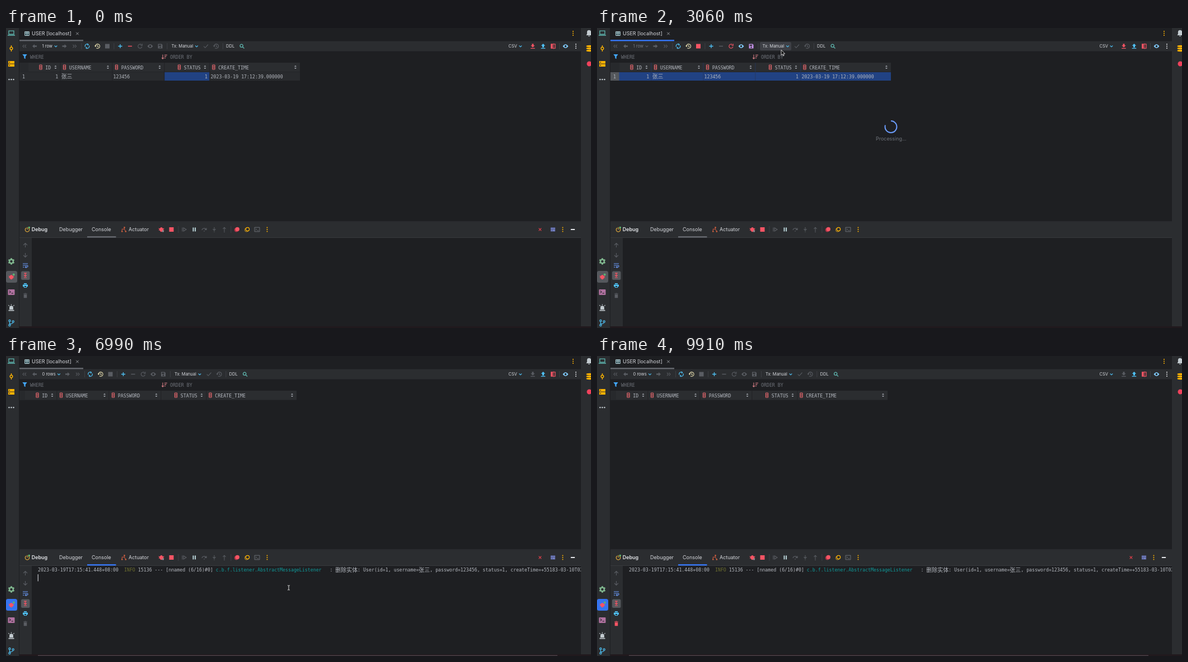
Recreate the animation shown at these times as an HTML page with a canvas. Size 1045 px wide and 536 px high, loop 9970 ms.

```html
<!DOCTYPE html>
<html lang="en">
<head>
<meta charset="utf-8">
<title>Table editor</title>
<style>
html, body { margin: 0; width: 100%; height: 100%; overflow: hidden; background: #1e1f22; }
canvas { display: block; }
</style>
</head>
<body>
<canvas id="stage" width="1045" height="536"></canvas>
<script>
const ctx = document.getElementById('stage').getContext('2d');
const LOOP = 9970;
const BG = '#1e1f22', PANEL = '#2b2d30', EDGE = '#43454a', DIM = '#5a5d63', TEXT = '#d5d7dc', MONO = '#b4b8bf',
  SELECT = '#214283', FOCUS = '#3574f0', IDLE = '#63666c',
  RED = '#f75464', CYAN = '#4fc3f7', ORANGE = '#ffb300', TEAL = '#5fb8b0', PURPLE = '#c792ea';
const PITCH = 4.966;

// Times of the user's actions
const ROW_CLICK = 1000, DELETE = 2130, SAVE = 2740, SAVED = 3400, CONSOLE_CLICK = 4640, LOGGED = 6980,
  DRAG = 7980, DROP = 8420, DESELECT = 9000;
const presses = [[ROW_CLICK, 1400], [DELETE, 2330], [SAVE - 90, 2800], [CONSOLE_CLICK, 4880], [DRAG, DROP], [DESELECT, 9130]];
const caretOn = [[CONSOLE_CLICK, 5190], [5660, 6190], [6650, 7580], [8050, 8840], [9110, 9640]];
const route = [
  [70, 330, 485], [930, 34, 86], [1450, 34, 86], [2000, 222, 33], [2350, 222, 33], [2600, 276, 33], [2800, 276, 33],
  [3050, 329, 39], [3450, 329, 39], [4060, 480, 200], [4390, 471, 416], [4880, 471, 416], [5190, 490, 415],
  [5660, 505, 414], [7560, 505, 414], [7940, 588, 382], [8050, 588, 382], [8450, 654, 412], [9060, 654, 412],
  [9280, 700, 320], [9510, 640, 512]
];

const ring = (r, x = 0, y = 0) => `M${x + r} ${y}A${r} ${r} 0 1 1 ${x - r} ${y}A${r} ${r} 0 1 1 ${x + r} ${y}Z`;
const dots3 = ring(1, 0, -3.5) + ring(1) + ring(1, 0, 3.5);
const P = {
  prev2: 'M-.5 -2.7L-3 0L-.5 2.7M3 -2.7L.5 0L3 2.7',
  next2: 'M.5 -2.7L3 0L.5 2.7M-3 -2.7L-.5 0L-3 2.7',
  left: 'M4 -1.2H0V-3.5L-4 0L0 3.5V1.2H4Z',
  right: 'M-4 -1.2H0V-3.5L4 0L0 3.5V1.2H-4Z',
  up: 'M0 4V-3.4M-3.4 0L0 -3.4L3.4 0',
  down: 'M0 -4V3.4M-3.4 0L0 3.4L3.4 0',
  chevron: 'M-2.3 -1L0 1.3L2.3 -1',
  cycle: 'M-3.4 1.2A3.5 3.5 0 0 1 2 -3M3.4 -1.2A3.5 3.5 0 0 1 -2 3M.4 -4.6L2.2 -3L.4 -1.4M-.4 4.6L-2.2 3L-.4 1.4',
  clock: 'M-3.7 0A3.9 3.9 0 1 1 -2.2 3.1M-5 -1L-3.7 .6L-2.2 -1M.2 -2.2V.4L2 1.5',
  revert: 'M3.4 1A3.6 3.6 0 1 1 2.4 -2.6M3.8 -4.2V-1.2H.9',
  square: 'M-4 -4H4V4H-4Z',
  plus: 'M-3.6 0H3.6M0 -3.6V3.6',
  minus: 'M-3.6 0H3.6',
  eye: 'M-5 0Q0 -7 5 0Q0 7 -5 0Z' + ring(1.9),
  save: 'M-4 -4H2.4L4 -2.4V4H-4ZM-2.6 -2.8V-.6H1.6V-2.8Z' + ring(1.3, 0, 1.8),
  check: 'M-3.8 .2L-1.2 2.8L4 -2.8',
  search: ring(2.6, -.8, -.8) + 'M1.1 1.1L4 4',
  download: 'M-1.5 -4.2H1.5V-1.4H3.7L0 2.2L-3.7 -1.4H-1.5ZM-3.8 3.2H3.8V4.4H-3.8Z',
  upload: 'M-1.5 2.2H1.5V-.8H3.7L0 -4.4L-3.7 -.8H-1.5ZM-3.8 3.2H3.8V4.4H-3.8Z',
  close: 'M-2.3 -2.3L2.3 2.3M2.3 -2.3L-2.3 2.3',
  column: 'M-2.1 -4H2.1V4H-2.1ZM-2.1 -1.3H2.1M-2.1 1.3H2.1',
  sort: 'M-2 -.9L0 -3L2 -.9ZM-2 .9L0 3L2 .9Z',
  grid: 'M-3.8 -3.5H3.8V3.5H-3.8ZM-3.8 -1H3.8M0 -3.5V3.5',
  funnel: 'M-4.2 -4H4.2L1.2 0V4.2L-1.2 3V0Z',
  order: 'M-3 -4V3.4M-4.8 1.6L-3 3.6L-1.2 1.6M0 -3.3H5M0 -.6H3.4M0 2.1H1.8',
  bug: 'M-2.8 -1.8Q0 -6 2.8 -1.8L4.8 -2.4V-1.2L3.4 -.6V.4H4.8V1.6H3.2Q0 7 -3.2 1.6H-4.8V.4H-3.4V-.6L-4.8 -1.2V-2.4Z',
  power: 'M-2 -2.7A3.7 3.7 0 1 0 2 -2.7M0 -4.2V.2',
  resume: 'M-3.6 -3.5V3.5M-1.4 -3L3.6 0L-1.4 3Z',
  pause: 'M-2.8 -3.5H-.8V3.5H-2.8ZM.8 -3.5H2.8V3.5H.8Z',
  over: 'M-4 1A4 4 0 0 1 3.4 0M4 -2.8V.4H.9M-1 3H1',
  into: 'M0 -4V1.6M-2.6 -.8L0 1.8L2.6 -.8M-.8 4H.8',
  out: 'M0 3V-3.6M-2.6 -1L0 -3.8L2.6 -1M-.8 4.4H.8',
  terminal: 'M-4.5 -3.8H4.5V3.8H-4.5ZM-2.7 -1.6L-1 0L-2.7 1.6M.3 1.8H2.6',
  wrap: 'M-4.5 -3H4.5M-4.5 0H3A1.6 1.6 0 0 1 3 3.2H.2M1.8 1.5L0 3.2L1.8 4.8M-4.5 3.2H-1.8',
  scroll: 'M-2.5 -3.8H2.5M0 -3.5V1.8M-2.5 -.6L0 2L2.5 -.6M-2.5 4H2.5',
  printer: 'M-2.6 -4H2.6V-2.2H-2.6ZM-4.5 -1.6H4.5V2H2.7V4H-2.7V2H-4.5ZM-1.6 1V3H1.6V1Z',
  trash: 'M-3.3 -3.8H-1.2L-.6 -4.4H.6L1.2 -3.8H3.3V-2.8H-3.3ZM-2.8 -2.1H2.8V4.3H-2.8Z',
  laptop: 'M-4.5 -3.8H4.5V2.2H-4.5ZM-6.5 4H6.5',
  commit: ring(2.3) + 'M0 -5.5V-2.3M0 2.3V5.5',
  servers: 'M-5.5 -5H5.5V-.6H-5.5ZM-5.5 .6H5.5V5H-5.5ZM-4 -3.5V-2.1H-2.4V-3.5ZM-4 2.1V3.5H-2.4V2.1Z',
  alarm: 'M-3.4 3V-.4A3.4 3.4 0 0 1 3.4 -.4V3ZM-5 3.8H5V5.6H-5ZM-.6 -6.5H.6V-4.7H-.6ZM-5.6 -4.4L-4.7 -5.2L-3.3 -3.8L-4 -3ZM5.6 -4.4L4.7 -5.2L3.3 -3.8L4 -3Z',
  branch: ring(1.6, -3, -4) + ring(1.6, -3, 4) + ring(1.6, 3.2, -2.6) + 'M-3 -2.4V2.4M3.2 -1Q3 1.5 -3 1.8',
  graph: 'M-3.2 3.4V-.6H1V-3.4M1 -.6L3.4 3.6',
  bell: 'M-5 4H5L3.6 1.8V-1.6A3.6 3.6 0 0 0 -3.6 -1.6V1.8ZM-1.3 4.8H1.3V6H-1.3Z',
  layout: 'M-4 -3.4H4V3.4H-4ZM-4 0H4M-1.3 -3.4V3.4M1.5 -3.4V0',
  arrow: 'M0 0V11.2L2.6 8.8L4.3 12.6L6 11.8L4.4 8.2H7.8Z',
  beam: 'M-2 -4H-.5L0 -3.4L.5 -4H2M0 -3.4V3.4M-2 4H-.5L0 3.4L.5 4H2'
};

function at(x, y, paint) {
  ctx.save();
  ctx.translate(x, y);
  paint();
  ctx.restore();
}
function line(path, x, y, color, width = 1.1) {
  at(x, y, () => {
    ctx.strokeStyle = color;
    ctx.lineWidth = width;
    ctx.stroke(new Path2D(path));
  });
}
function fill(path, x, y, color) {
  at(x, y, () => {
    ctx.fillStyle = color;
    ctx.fill(new Path2D(path), 'evenodd');
  });
}
function box(x1, y1, x2, y2, color, radius = 0) {
  ctx.fillStyle = color;
  ctx.beginPath();
  ctx.roundRect(x1, y1, x2 - x1, y2 - y1, radius);
  ctx.fill();
}
function label(text, x, y, color = TEXT, size = 8.95, weight = 400) {
  ctx.font = `${weight} ${size}px Inter, sans-serif`;
  ctx.fillStyle = color;
  ctx.fillText(text, x, y + size * .364);
}
// Wide characters take two columns of the monospaced grid.
function mono(text, x, y, color = MONO) {
  ctx.fillStyle = color;
  for (const [run] of text.matchAll(/[ -~]+|[^ -~]+/g)) {
    const wide = run > '~';
    ctx.font = wide ? '9.93px "Noto Sans CJK SC", "Noto Sans CJK JP", sans-serif' : '8.25px "DejaVu Sans Mono", monospace';
    ctx.fillText(run, x, y + (wide ? 3.6 : 3));
    x += run.length * PITCH * (wide ? 2 : 1);
  }
}
const within = (t, spans) => spans.some(([from, to]) => t >= from && t < to);

function cursorAt(t) {
  const i = route.findIndex(key => key[0] > t);
  if (i < 1) return null;
  const [t0, x0, y0] = route[i - 1], [t1, x1, y1] = route[i];
  const u = (t - t0) / (t1 - t0), e = u * u * (3 - 2 * u);
  return { x: x0 + (x1 - x0) * e, y: y0 + (y1 - y0) * e };
}

function drawEditor(t) {
  const pending = t >= DELETE && t < SAVED, saving = t >= SAVE && t < SAVED, empty = t >= SAVED;
  const tableFocus = t >= ROW_CLICK && t < CONSOLE_CLICK;

  fill(P.grid, 37.5, 10, '#35525a');
  line(P.grid, 37.5, 10, '#b9d3d8', 1);
  label('USER [localhost]', 46, 10);
  line(P.close, 127.5, 10, '#a0a3a9', .9);
  fill(dots3, 1013, 9.5, ORANGE);
  box(24, 23.5, 1027, 41.5, PANEL);
  box(24, 21, 138, 23.5, tableFocus ? FOCUS : IDLE);

  const y = 32.5, s = empty ? 5.5 : 0, small = 7.55;
  const tool = pending ? null : DIM;
  line(P.prev2, 33, y, DIM);
  fill(P.left, 51, y, DIM);
  label(empty ? '0 rows' : '1 row', 64.5, y, saving ? '#777a80' : TEXT, small);
  line(P.chevron, 89 + s, y, saving ? DIM : CYAN);
  fill(P.right, 104.5 + s, y, DIM);
  line(P.next2, 122.5 + s, y, DIM);
  line(P.cycle, 145 + s, y, CYAN);
  line(P.clock, 163.5 + s, y, '#e8dfb0');
  fill(P.square, 181 + s, y, saving ? RED : DIM);
  line(P.plus, 204 + s, y, CYAN, 1.3);
  line(P.minus, 221.5 + s, y, pending || empty ? DIM : RED, 1.4);
  line(P.revert, 239.5 + s, y, tool || RED);
  fill(P.eye, 257.5 + s, y, tool || '#82cfff');
  fill(P.save, 275.5 + s, y, tool || PURPLE);
  for (const x of [134.5, 192.5, 287.5, 387]) box(x + s, 27, x + s + .8, 38, EDGE);
  if (t >= 2980 && t < 3560) box(291 + s, 25, 347 + s, 40, '#3e4046', 2.5);
  label('Tx: Manual', 295.5 + s, y, TEXT, small);
  line(P.chevron, 340.5 + s, y, CYAN);
  line(P.check, 357 + s, y, DIM);
  line(P.clock, 375.5 + s, y, DIM);
  label('DDL', 393 + s, y, TEXT, small);
  line(P.search, 421.5 + s, y, TEAL, 1.3);

  label('CSV', 897.5, y, TEXT, small);
  line(P.chevron, 919, y, CYAN);
  fill(P.download, 941, y, empty ? DIM : RED);
  fill(P.upload, 959.5, y, CYAN);
  line('M-3.7 -3.8H3.7V3.8H-3.7Z', 977.5, y, RED);
  fill('M-4 -4H-.8V4H-4ZM.4 -5H1.2V5H.4Z', 977.5, y, RED);
  box(988, 27, 988.8, 38, EDGE);
  fill(P.eye, 999.5, y, '#82cfff');
  fill(dots3, 1018, y, '#e4e6ea');

  fill(P.funnel, 33.5, 51, '#42a5f5');
  mono('WHERE', 43, 51.5, '#6f737a');
  line(P.order, 283, 51.5, '#d77f86');
  mono('ORDER BY', 293, 51.5, '#6f737a');

  drawTable(t, empty, pending);
  if (saving) {
    const start = -Math.PI / 2 + (t - 3060) / 1000 * 2 * Math.PI;
    ctx.strokeStyle = '#6b9bfa';
    ctx.lineWidth = 2;
    ctx.beginPath();
    ctx.arc(525, 176.5, 10.5, start, start + 5);
    ctx.stroke();
    label('Processing...', 498, 197.5, '#6f737a');
  }
}

function drawTable(t, empty, pending) {
  const s = empty ? -6 : 0, selected = t >= ROW_CLICK + 60;
  box(24, 62, 525 + s, 78.5, PANEL);
  box(24, 62, 40 + s, 78.5, '#27292c');
  const columns = [['ID', 62, 88.5], ['USERNAME', 104.5, 182], ['PASSWORD', 197.5, 274.5], ['STATUS', 309.5, 355.5], ['CREATE_TIME', 371, 517]];
  for (const [name, x, sortX] of columns) {
    line(P.column, x + s, 70, '#f06a70', 1);
    mono(name, x + 8.3 + s, 70.5);
    fill(P.sort, sortX + s, 70, '#b4b8bf');
  }
  if (!empty) {
    box(24, 79, 525, 94, selected ? SELECT : '#292b2e');
    if (pending) box(24, 79, 39.5, 94, '#55585c');
    if (!selected) box(283, 79, 363.5, 94, SELECT);
    mono('1', 29, 86.5);
    mono('1', 88.3, 86.5);
    mono('张三', 98.7, 86.5);
    mono('123456', 191.5, 86.5);
    mono('1', 355, 86.5);
    mono('2023-03-19 17:12:39.000000', 365.5, 86.5);
  }
  for (const x of [96.5, 189.5, 282.5, 363.5]) box(x + s, 62, x + s + .8, empty ? 78.5 : 94, selected && !empty ? '#25375f' : BG);
}

function drawDebug(t, cursor) {
  const y = 360;
  box(24, 345, 1027, 347, '#292a2e');
  box(24, 347, 1027, 374, PANEL);
  box(24, 374, 1027, 375, '#37393d');
  box(24, 375, 46, 536, PANEL);
  line(P.power, 38, y, '#e0a83c', 1.2);
  fill(ring(1.7), 41.3, 356.5, '#5fbf73');
  label('Debug', 45.8, y, '#e4e6ea', 8.95, 600);
  label('Debugger', 95, y);
  label('Console', 153, y);
  box(145, 372, 196.5, 374.5, t > CONSOLE_CLICK + 80 ? FOCUS : IDLE);
  line(P.graph, 210.5, y, '#b5523d', 1.1);
  for (const [dx, dy] of [[-3.2, 3.4], [1, -3.6], [3.4, 3.6]]) fill(ring(1.3), 210.5 + dx, y + dy, '#c9603f');
  label('Actuator', 219, y);
  fill(P.bug, 277.5, y, RED);
  fill(ring(1.7), 280.5, 363, '#8a8d93');
  fill(P.square, 295.5, y, RED);
  line(P.resume, 318.5, y, DIM);
  fill(P.pause, 336.3, y, '#b9d3d8');
  line(P.over, 354, y, DIM);
  line(P.into, 372, y, DIM);
  line(P.out, 390, y, DIM);
  for (const x of [307.5, 401.5]) box(x, 354, x + .8, 366, EDGE);
  fill(ring(3.7), 411.5, y + .7, '#a83445');
  fill(ring(3.7), 413.3, y - .6, RED);
  line(ring(3.2), 429.8, y + .8, '#b08328');
  fill(ring(3.2), 431.5, y - .5, PANEL);
  line(ring(3.2), 431.5, y - .5, ORANGE, 1.2);
  line(P.terminal, 448.5, y, '#71757b', .9);
  fill(dots3, 466.5, y, ORANGE);
  if (!cursor || cursor.y > 346) {
    line(P.close, 954, y, '#e5404b', 1.2);
    fill(P.layout, 977, y, '#7986cb');
    line(P.layout, 977, y, '#40466a', .6);
    fill(dots3, 994.5, y, ORANGE);
    line(P.minus, 1012.5, y, '#e4e6ea', 2);
  }

  const dragging = t >= DRAG && t < DESELECT, onLine = cursor && cursor.y < 389;
  line(P.up, 34.5, 388, DIM);
  line(P.down, 34.5, 406, DIM);
  line(P.wrap, 34.5, 424, '#6b9bfa');
  if (!(dragging && onLine)) box(27, 434.5, 42.5, 450, '#55585d', 2.5);
  line(P.scroll, 34.5, 442, RED, 1.2);
  fill(P.printer, 34.5, 460, CYAN);
  fill(P.trash, 34.5, 478, t >= 7250 ? RED : DIM);

  const logged = t >= LOGGED, column = n => 57 + n * PITCH;
  box(24, 533, 1027, 536, '#21191d');
  if (logged) {
    if (dragging) box(column(107), 375, onLine ? Math.max(column(107), cursor.x) : 1027, 389, SELECT);
    mono('2023-03-19T17:15:41.448+08:00', column(0), 382);
    mono('INFO', column(31), 382, '#6e7030');
    mono('15136 --- [nnamed (6/16)#0]', column(36), 382);
    mono('c.b.f.listener.AbstractMessageListener', column(64), 382, '#0f9b9b');
    mono(': 删除实体: User(id=1, username=张三, password=123456, status=1, createTime=+55183-03-10T02', column(105), 382);
    box(57, 534.5, 985, 536, '#4a4047');
  }
  if (within(t, caretOn)) {
    const top = logged ? 390 : 375.5;
    box(56.7, top, 57.8, top + 12.5, '#d5d7dc');
  }
}

function drawSidebars(t) {
  box(0, 0, 23, 536, PANEL);
  box(1027, 0, 1045, 536, PANEL);
  line(P.laptop, 9.5, 9, TEAL, 1.3);
  line(P.commit, 9.5, 36.5, ORANGE, 1.4);
  fill(P.servers, 9.5, 64, ORANGE);
  fill(ring(1.3, -4) + ring(1.3) + ring(1.3, 4), 9.5, 92, '#c3cbd0');
  line(ring(3.4), 9.5, 417, '#81b88f', 2.4);
  for (let i = 0; i < 6; i++) at(9.5, 417, () => {
    ctx.rotate(i * Math.PI / 3);
    box(-1.3, -5.8, 1.3, -4, '#81b88f');
  });
  box(0, 434, 20, 455, t >= CONSOLE_CLICK ? FOCUS : '#55585d', 3.5);
  fill(P.bug, 9.5, 445, RED);
  fill(ring(2), 13.7, 440.5, '#5fae73');
  box(3.5, 467, 15.5, 477, '#b0719f', 1);
  line('M-3.6 -2.2L-1.4 0L-3.6 2.2M.2 2.4H3.4', 9.5, 471.5, PANEL);
  fill(P.alarm, 9.5, 500, '#c3cbd0');
  line(P.branch, 9.5, 527, CYAN, 1.2);
  fill(P.bell, 1041.5, 9, '#c3cbd0');
  for (const y of [32.5, 36.5, 40.5]) {
    ctx.fillStyle = ORANGE;
    ctx.beginPath();
    ctx.ellipse(1042, y, 5.5, 1.7, 0, 0, 7);
    ctx.fill();
  }
  fill(ring(4.5), 1042, 64, '#f0425c');
  box(1027, 533, 1045, 536, '#21191d');
}

function drawCursor(t, cursor) {
  const { x, y } = cursor;
  if (within(t, presses)) fill(ring(8.4), x, y, 'rgba(158,150,8,.82)');
  if (y > 375 && x > 46) {
    line(P.beam, x, y, '#17181a', 2);
    line(P.beam, x, y, '#e8e8e8', 1);
  } else at(x, y, () => {
    ctx.scale(.86, .86);
    fill(P.arrow, 0, 0, '#111');
    line(P.arrow, 0, 0, '#e8e8e8', 1);
  });
}

const began = performance.now();
function frame() {
  const t = (performance.now() - began) % LOOP, cursor = cursorAt(t);
  box(0, 0, 1045, 536, BG);
  drawEditor(t);
  drawDebug(t, cursor);
  drawSidebars(t);
  if (cursor) drawCursor(t, cursor);
  requestAnimationFrame(frame);
}
frame();
</script>
</body>
</html>
```
